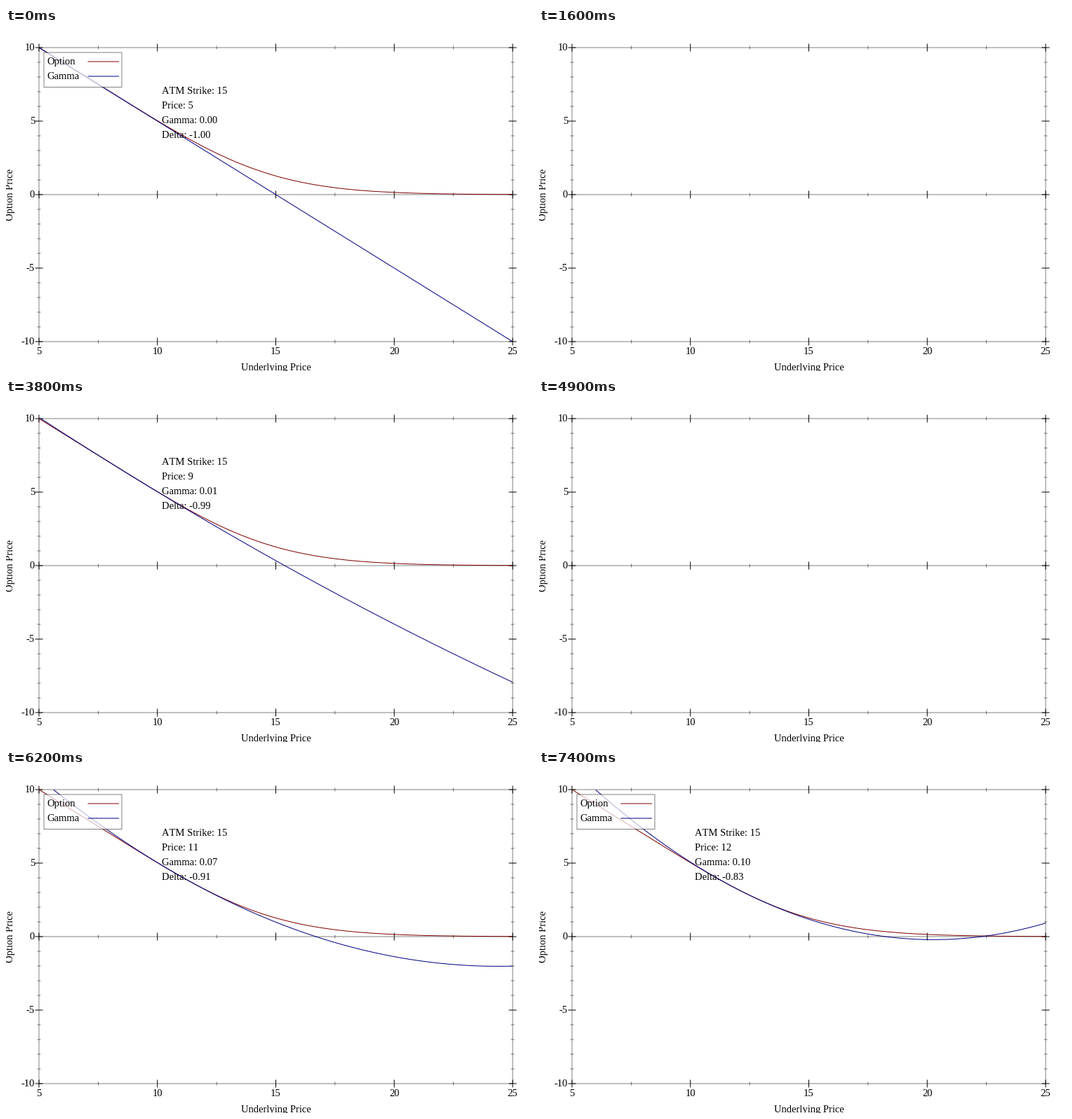
Write a matplotlib script that moves like this. It is 751 px wide and 490 px high and loops after 8000 ms.

```python
import math

import matplotlib.pyplot as plt
import numpy as np
from matplotlib.animation import FuncAnimation
from matplotlib.patches import Rectangle

WIDTH, HEIGHT, DPI = 751, 490, 64
PX = 72 / DPI                       # one pixel in points
LEFT, RIGHT, TOP, BOTTOM = 47, 722, 28, 448
STRIKE, VOL, EXPIRY = 15, 0.3, 0.5
RED, BLUE = "#800000", "#000080"

plt.rcParams["font.family"] = "Liberation Serif"
plt.rcParams["font.size"] = 14.67 * PX
plt.rcParams["text.kerning_factor"] = 6   # no pair kerning
plt.rcParams["path.snap"] = False

fig = plt.figure(figsize=(WIDTH / DPI, HEIGHT / DPI), dpi=DPI, facecolor="white")
ax = fig.add_axes([0, 0, 1, 1])
ax.set_xlim(0, WIDTH)
ax.set_ylim(HEIGHT, 0)
ax.axis("off")


def px_x(price):
    return LEFT + (price - 5) * (RIGHT - LEFT) / 20


def px_y(value):
    return TOP + (10 - value) * (BOTTOM - TOP) / 20


def line(xs, ys, color="black", width=1.0, z=2):
    return ax.plot(xs, ys, color=color, lw=width * PX, zorder=z,
                   solid_capstyle="butt")[0]


def text(x, y, s="", z=4, **kw):
    return ax.text(x, y, s, color="black", va="baseline", zorder=z, **kw)


def cdf(d):
    return 0.5 * (1 + math.erf(d / math.sqrt(2)))


def put(spot):
    """Black-Scholes put at zero interest: value, delta and gamma."""
    dev = VOL * math.sqrt(EXPIRY)
    d1 = math.log(spot / STRIKE) / dev + dev / 2
    value = STRIKE * cdf(dev - d1) - spot * cdf(-d1)
    gamma = math.exp(-d1 * d1 / 2) / math.sqrt(2 * math.pi) / (spot * dev)
    return value, -cdf(-d1), gamma


def draw_axes():
    parts = []
    thin, major, minor = 0.5, (5.5, 1.0), (2.5, 0.5)
    for y in (TOP, px_y(0), BOTTOM):
        parts.append(line([LEFT, RIGHT], [y, y], width=thin))
        for i in range(9):
            x = px_x(5 + 2.5 * i)
            r, w = minor if i % 2 else major
            parts.append(line([x, x], [y - r, y + r], width=w))
    for x in (LEFT, RIGHT):
        parts.append(line([x, x], [TOP, BOTTOM], width=thin))
        for v in range(-10, 11):
            r, w = minor if v % 5 else major
            parts.append(line([x - r, x + r], [px_y(v)] * 2, width=w))
    for v in range(-10, 11, 5):
        parts.append(text(41, px_y(v) + 4, str(v), ha="right"))
    for v in range(5, 26, 5):
        parts.append(text(px_x(v), 466, str(v), ha="center"))
    return parts


def draw_legend():
    box = (54, 35), 111, 49.5
    parts = [
        ax.add_patch(Rectangle(*box, fc="white", ec="none", alpha=0.7, zorder=5)),
        ax.add_patch(Rectangle(*box, fc="none", ec="black", lw=0.5 * PX, zorder=5)),
    ]
    for name, color, y in (("Option", RED, 48), ("Gamma", BLUE, 69)):
        parts.append(text(58, y + 4, name, z=6))
        parts.append(line([116.5, 161], [y, y], color, z=6))
    return parts


text((LEFT + RIGHT) / 2, 489, "Underlying Price", ha="center")
text(10, px_y(0), "Option Price", rotation=90, ha="center",
     rotation_mode="anchor")

axes_parts = draw_axes()
legend = draw_legend()
prices = np.linspace(5, 25, 1201)
values = np.array([put(p)[0] for p in prices])
option = line(px_x(prices), px_y(values), RED, z=3)
approx = line([], [], BLUE, z=3)
notes = [text(222, 94 + 21 * i) for i in range(4)]

BARE, EMPTY, PLOT, FULL = range(4)  # how much of the picture is drawn
# start in tenths of a second, underlying price, stage of drawing
STEPS = [(0, 5, FULL), (6, 6, PLOT), (7, 6, FULL), (16, 7, EMPTY),
         (17, 7, FULL), (28, 8, FULL), (38, 9, PLOT), (39, 9, FULL),
         (49, 10, EMPTY), (50, 10, FULL), (61, 11, PLOT), (62, 11, FULL),
         (73, 12, BARE), (74, 12, FULL)]


def show(parts, on):
    for part in parts:
        part.set_visible(on)


def update(tick):
    _, spot, stage = [s for s in STEPS if s[0] <= tick][-1]
    value, delta, gamma = put(spot)
    move = prices - spot
    curve = value + delta * move + gamma * move ** 2 / 2
    curve[np.abs(curve) > 10.005] = np.nan
    approx.set_data(px_x(prices), px_y(curve))
    labels = (f"ATM Strike: {STRIKE}", f"Price: {spot}",
              f"Gamma: {gamma:.2f}", f"Delta: {delta:.2f}")
    for note, label in zip(notes, labels):
        note.set_text(label)
    show(axes_parts, stage >= EMPTY)
    show([option, approx, *notes], stage >= PLOT)
    show(legend, stage == FULL)
    return [option, approx, *notes]


anim = FuncAnimation(fig, update, frames=80, interval=100, repeat=True,
                     repeat_delay=0, blit=False)
plt.show()
```
